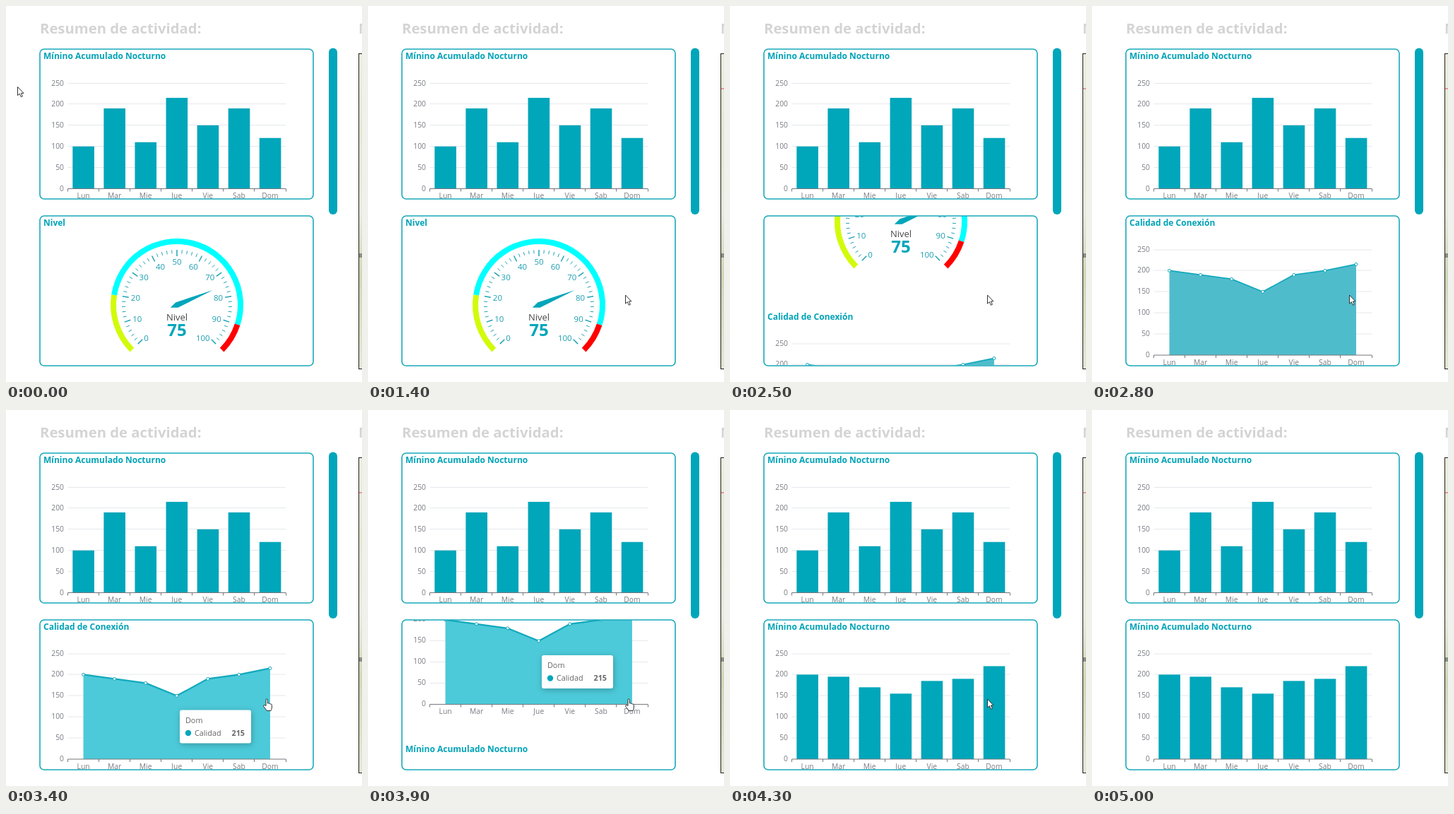
An HTML page that plays this animation: 504x532 px, repeating every 5100 ms.

```html
<!DOCTYPE html>
<html lang="es">
<head>
<meta charset="utf-8">
<title>Resumen de actividad</title>
<style>
  html, body { margin: 0; width: 100%; height: 100%; overflow: hidden; background: #fff; }
  svg { display: block; width: 504px; height: 532px; font-family: "Open Sans", "Noto Sans", sans-serif; }
  .heading { font-size: 20.3px; font-weight: 700; fill: #d4d4d4; }
  .title { font-size: 12px; font-weight: 700; fill: #00a3b7; }
  .axis { font-size: 10.3px; fill: #777a82; }
  .scale { font-size: 11.5px; fill: #1a9db0; }
  .teal { fill: #00a6ba; }
  .grid { stroke: #e6e8ec; }
  .base { stroke: #74767c; fill: none; }
  .card { fill: none; stroke: #19a9bb; stroke-width: 1.6; }
  .tip text { font-size: 10.8px; fill: #666; }
  .tip rect { fill: #fff; filter: drop-shadow(1px 2px 4px rgba(0, 0, 0, .25)); }
  .cursor { fill: #fff; stroke: #333; stroke-linejoin: round; }
</style>
</head>
<body>
<svg viewBox="0 0 504 532">
  <defs>
    <clipPath id="clipTop"><rect x="48" y="61" width="387" height="211.3"/></clipPath>
    <clipPath id="clipLow"><rect x="48" y="297" width="387" height="211.3"/></clipPath>
    <linearGradient id="land" x1="0" y1="0" x2="0" y2="1">
      <stop offset="0" stop-color="#ecebdc"/>
      <stop offset=".25" stop-color="#e3e7cf"/>
      <stop offset=".5" stop-color="#e9e9dc"/>
      <stop offset=".7" stop-color="#cfd6b4"/>
      <stop offset="1" stop-color="#e4e6d2"/>
    </linearGradient>
  </defs>

  <text class="heading" x="48" y="39">Resumen de actividad:</text>
  <text class="heading" x="499" y="39">M</text>
  <rect x="499.5" y="67.5" width="20" height="446" fill="url(#land)" stroke="#222"/>
  <rect id="road" x="500" y="116" width="4" height="2" fill="#e79a94"/>
  <rect x="500" y="350" width="4" height="6" fill="#8a9080"/>
  <rect class="teal" x="457" y="59.5" width="12" height="235.5" rx="6"/>

  <g clip-path="url(#clipTop)" id="top"></g>
  <g clip-path="url(#clipLow)"><g id="list"></g></g>
  <rect class="card" x="48" y="61" width="387" height="212" rx="6"/>
  <rect class="card" x="48" y="297" width="387" height="212" rx="6"/>

  <g id="cursor">
    <path id="arrow" class="cursor" d="M.5 .5V12.6L3.3 10.1 5.3 14.7 7.4 13.8 5.4 9.4H9Z"/>
    <path id="hand" class="cursor" d="M4 10V1.6Q4 .4 5.2 .4T6.4 1.6V6.5Q8 5.8 8.6 7 10 6.4 10.6 7.6 12.4 7.2 12.4 9V12.5Q12 15 11 17H5.2Q3.5 14 .6 10.8 0 9.2 1.8 9Z"/>
  </g>
</svg>
<script>
const $ = id => document.getElementById(id);
const LOOP = 5100, FRAME = 100, PITCH = 251, CARD_GAP = 235.5;
const AXIS_Y = 258.5, LEFT = 87.5, RIGHT = 396;
const days = ['Lun', 'Mar', 'Mie', 'Jue', 'Vie', 'Sab', 'Dom'];
const step = (RIGHT - LEFT) / days.length;
const midX = i => LEFT + step * (i + .5);
const valY = v => AXIS_Y - v * .598;

const text = (cls, x, y, str, anchor = 'start') =>
  `<text class="${cls}" x="${x}" y="${y}" text-anchor="${anchor}">${str}</text>`;
const title = str => text('title', 53, 75, str);

function gridLines() {
  let s = '';
  for (let v = 0; v <= 250; v += 50) {
    const y = Math.floor(valY(v)) + .5;
    if (v) s += `<path class="grid" d="M${LEFT} ${y}H${RIGHT}"/>`;
    s += text('axis', 82, y + 3, v, 'end');
  }
  return s;
}

function baseLine() {
  let d = `M${LEFT} ${AXIS_Y}H${RIGHT}`;
  for (let i = 0; i <= days.length; i++) d += `M${Math.floor(LEFT + step * i) + .5} ${AXIS_Y}v4`;
  return `<path class="base" d="${d}"/>` +
    days.map((day, i) => text('axis', midX(i), AXIS_Y + 13.7, day, 'middle')).join('');
}

function barChart(name, values) {
  const bars = values.map((v, i) =>
    `<rect class="teal" x="${midX(i) - 15.2}" y="${valY(v)}" width="30.6" height="${AXIS_Y - valY(v)}"/>`);
  return title(name) + gridLines() + bars.join('') + baseLine();
}

function areaChart(name, values) {
  const pts = values.map((v, i) => `${midX(i)} ${valY(v)}`);
  const line = 'M' + pts.join('L');
  const dots = values.map((v, i) =>
    `<circle cx="${midX(i)}" cy="${valY(v)}" r="2" fill="#fff" stroke="#12a5b8"/>`);
  return title(name) + gridLines() +
    `<path id="area" d="${line}V${AXIS_Y}H${midX(0)}Z"/>` + baseLine() +
    `<path id="line" d="${line}" fill="none" stroke="#12a9bc"/>` + dots.join('');
}

function gauge(name, value) {
  const cx = 242, cy = 187.5;
  const angle = v => (225 - v * 2.7) * Math.PI / 180;
  const at = (v, r) => [cx + r * Math.cos(angle(v)), cy - r * Math.sin(angle(v))];
  const arc = (a, b, color) =>
    `<path d="M${at(a, 90)}A90 90 0 ${b - a > 66 ? 1 : 0} 1 ${at(b, 90)}" fill="none" stroke="${color}" stroke-width="8"/>`;
  let s = title(name) + arc(0, 20, '#d2fb0a') + arc(20, 90, '#00ffff') + arc(90, 100, '#ff0000');
  for (let v = 0; v <= 100; v += 2) {
    const major = v % 10 === 0;
    s += `<path d="M${at(v, 78)}L${at(v, major ? 69 : 73)}" stroke="#1fa3b5" stroke-width="${major ? 1.5 : 1}"/>`;
    if (!major) continue;
    const [x, y] = at(v, 66), c = Math.cos(angle(v));
    const anchor = c < -.4 ? 'start' : c > .4 ? 'end' : 'middle';
    s += text('scale', x, y + (Math.sin(angle(v)) > .8 ? 9 : 4), v, anchor);
  }
  s += `<path class="teal" transform="translate(${cx} ${cy}) rotate(${-225 + value * 2.7})" d="M-10 0L0-4 55 0 0 4Z"/>`;
  return s + `<text x="${cx}" y="209.5" font-size="13" fill="#464646" text-anchor="middle">${name}</text>` +
    `<text class="teal" x="${cx}" y="231.5" font-size="24" font-weight="700" text-anchor="middle">${value}</text>`;
}

const tooltip = `<g class="tip" id="tip" transform="translate(246 189)">
  <rect width="101" height="47" rx="3"/>
  <text x="8" y="18">Dom</text><circle class="teal" cx="12" cy="32.5" r="4.2"/>
  <text x="21" y="36.5">Calidad</text><text x="92" y="36.5" text-anchor="end" font-weight="700">215</text></g>`;

const NIGHT = 'Mínino Acumulado Nocturno';
$('top').innerHTML = barChart(NIGHT, [100, 190, 110, 215, 150, 190, 120]);
$('list').innerHTML = [
  gauge('Nivel', 75),
  areaChart('Calidad de Conexión', [200, 190, 180, 150, 190, 200, 215]) + tooltip,
  barChart(NIGHT, [200, 195, 170, 155, 185, 190, 220])
].map((s, i) => `<g transform="translate(0 ${i * PITCH})">${s}</g>`).join('');

const part = (t, from, to) => Math.min(1, Math.max(0, (t - from) / (to - from)));
const smooth = p => p * p * (3 - 2 * p);
const show = (id, on) => $(id).setAttribute('opacity', +on);

function draw(t) {
  const scroll = PITCH * (smooth(part(t, 2260, 2760)) + Math.sin(part(t, 3800, 4300) * Math.PI / 2));
  $('list').setAttribute('transform', `translate(0 ${CARD_GAP - scroll})`);

  const go = smooth(part(t, 0, 600));
  $('cursor').setAttribute('transform', `translate(${16 + 348 * go} ${114 + 294.5 * go})`);
  show('cursor', t < 4800);

  const hover = t >= 3100 && t < 4100;
  show('hand', hover);
  show('arrow', !hover);
  show('tip', part(t, 3000, 3300) * (1 - part(t, 3950, 4150)));
  $('area').setAttribute('fill', hover ? '#4ccad9' : '#4fbccc');
  $('line').setAttribute('stroke-width', hover ? 2.2 : 1.7);
  show('road', t >= 500);
}

function tick() {
  const t = performance.now() % LOOP;
  draw(Math.floor(t / FRAME) * FRAME);
  requestAnimationFrame(tick);
}
tick();
</script>
</body>
</html>
```
